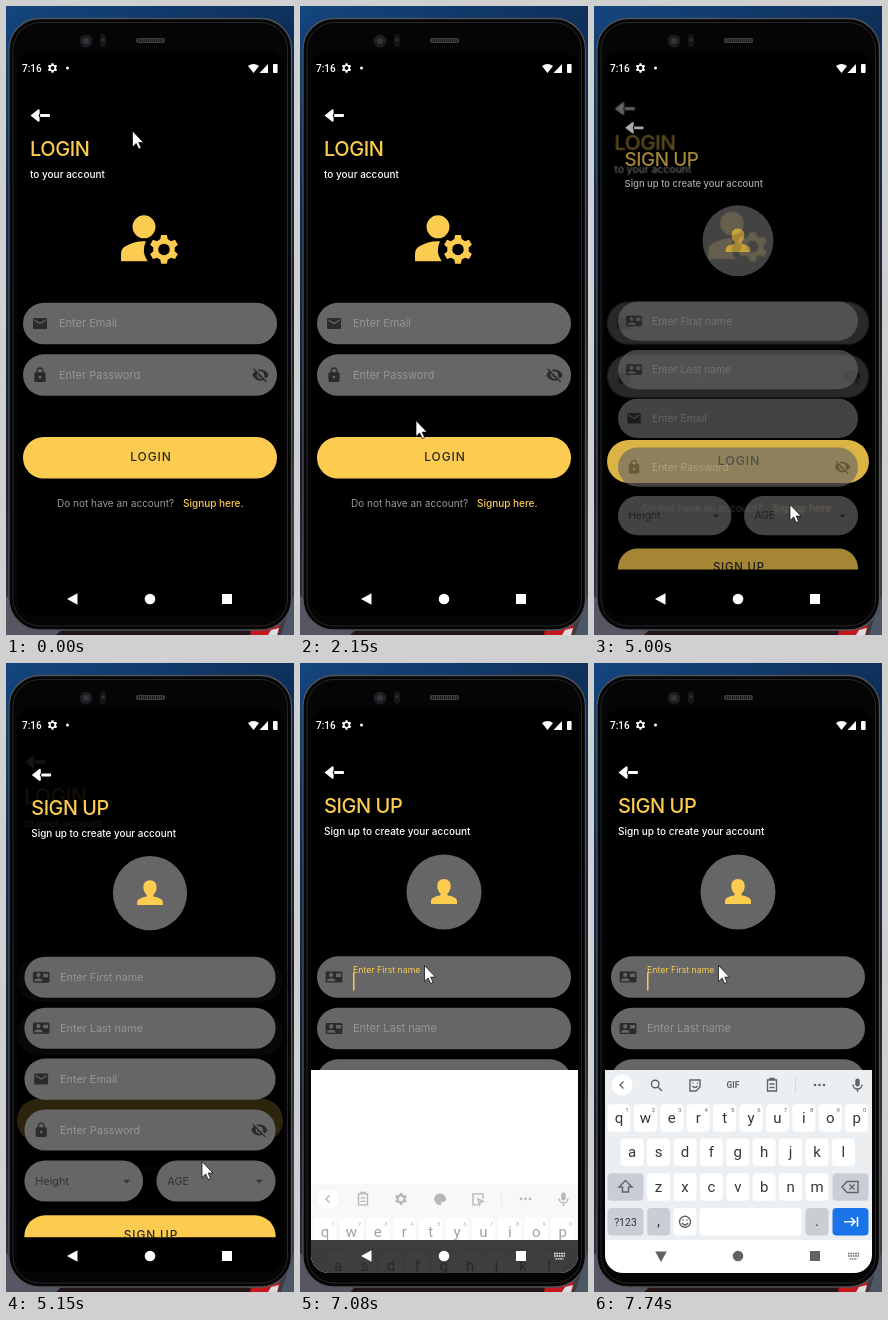
An HTML page for the animation above (8000 ms loop, 288 px wide and 629 px high).

```html
<!DOCTYPE html>
<html lang="en">
<head>
<meta charset="utf-8">
<title>Login and sign up</title>
<style>
  html, body { margin: 0; width: 100%; height: 100%; overflow: hidden; background: #000; }
  svg { display: block; width: 100vw; height: 100vh; }
  text { font-family: Inter, sans-serif; }
  .title { font-size: 20px; font-weight: 500; letter-spacing: -.45px; fill: #fbcc4f; }
  .sub { font-size: 10px; font-weight: 500; fill: #fff; }
  .hint { font-size: 11px; fill: #959595; }
  .dark { fill: #343434; }
  .button { font-size: 12px; font-weight: 500; letter-spacing: .9px; text-anchor: middle; fill: #282828; }
  .small { font-size: 10px; fill: #9a9a9a; }
  .key { font: 15px Roboto, sans-serif; text-anchor: middle; fill: #33373b; }
  .digit { font: 6px Roboto, sans-serif; text-anchor: middle; fill: #5f6368; }
  .bold { font: bold 8.5px Roboto, sans-serif; text-anchor: middle; fill: #5f6368; }
  .line { fill: none; stroke: #5f6368; stroke-width: 1.4; }
</style>
</head>
<body>
<script>
const YELLOW = '#fbcc4f', GRAY = '#666', LOOP = 8000;

const ICONS = {
  mail: 'M20 4H4c-1.1 0-2 .9-2 2v12c0 1.1.9 2 2 2h16c1.1 0 2-.9 2-2V6c0-1.1-.9-2-2-2zm0 4l-8 5-8-5V6l8 5 8-5v2z',
  lock: 'M18 8h-1V6c0-2.76-2.24-5-5-5S7 3.24 7 6v2H6c-1.1 0-2 .9-2 2v10c0 1.1.9 2 2 2h12c1.1 0 2-.9 2-2V10c0-1.1-.9-2-2-2zm-6 9c-1.1 0-2-.9-2-2s.9-2 2-2 2 .9 2 2-.9 2-2 2zm3.1-9H8.9V6c0-1.71 1.39-3.1 3.1-3.1s3.1 1.39 3.1 3.1v2z',
  card: 'M2 4h20a2 2 0 0 1 2 2v12a2 2 0 0 1-2 2H2a2 2 0 0 1-2-2V6a2 2 0 0 1 2-2zM8 6a3 3 0 1 1 0 6 3 3 0 0 1 0-6zM2 18v-1c0-2 4-3.1 6-3.1s6 1.1 6 3.1v1zM15 7h7v5h-7z',
  eye: 'M12 7c2.76 0 5 2.24 5 5 0 .65-.13 1.26-.36 1.83l2.92 2.92c1.51-1.26 2.7-2.89 3.43-4.75-1.73-4.39-6-7.5-11-7.5-1.4 0-2.74.25-3.98.7l2.16 2.16C10.74 7.13 11.35 7 12 7zM2 4.27l2.74 2.74C3.08 8.3 1.78 10.02 1 12c1.73 4.39 6 7.5 11 7.5 1.55 0 3.03-.3 4.38-.84L19.73 22 21 20.73 3.27 3zM7.53 9.8l1.55 1.55c-.05.21-.08.43-.08.65 0 1.66 1.34 3 3 3 .22 0 .44-.03.65-.08l1.55 1.55c-.67.33-1.41.53-2.2.53-2.76 0-5-2.24-5-5 0-.79.2-1.53.53-2.2z',
  gear: 'M15.75 12c0-.22-.03-.42-.06-.63l1.14-1.01-1-1.73-1.45.49c-.32-.27-.68-.48-1.08-.63L13 7h-2l-.3 1.49c-.4.15-.76.36-1.08.63l-1.45-.49-1 1.73 1.14 1.01c-.03.21-.06.41-.06.63s.03.42.06.63l-1.14 1.01 1 1.73 1.45-.49c.32.27.68.48 1.08.63L11 17h2l.3-1.49c.4-.15.76-.36 1.08-.63l1.45.49 1-1.73-1.14-1.01c.03-.21.06-.41.06-.63zM12 14a2 2 0 1 1 0-4 2 2 0 0 1 0 4z',
  person: 'M12 4a4 4 0 1 1 0 8 4 4 0 0 1 0-8zM12.67 13.02A13 13 0 0 0 5.39 14.82C4.5 15.34 4 16.3 4 17.35V20h9.26A7 7 0 0 1 12.67 13.02z'
};

// Icons use a 24 unit box centred on (x, y).
const icon = (name, x, y, scale, fill = '#2b2b2b') =>
  `<path d="${ICONS[name]}" fill="${fill}" fill-rule="evenodd" transform="translate(${x} ${y}) scale(${scale}) translate(-12 -12)"/>`;
const label = (cls, x, y, str, extra = '') => `<text class="${cls}" x="${x}" y="${y}" ${extra}>${str}</text>`;
const rect = (x, y, w, h, fill, r = 0) => `<rect x="${x}" y="${y}" width="${w}" height="${h}" rx="${r}" fill="${fill}"/>`;
const circle = (x, y, r, fill) => `<circle cx="${x}" cy="${y}" r="${r}" fill="${fill}"/>`;
const path = (d, fill) => `<path d="${d}" fill="${fill}"/>`;
const line = d => `<path class="line" d="${d}"/>`;

const pill = (y, fill = GRAY, x = 17, w = 254) => rect(x, y, w, 41.5, fill, 20.75);
const field = (y, name, hint, extra) =>
  pill(y) + icon(name, 34, y + 20.7, .7) + label('hint', 53, y + 24.6, hint, extra) +
  (name === 'lock' ? icon('eye', 254.5, y + 20.7, .74) : '');
const dropdown = (x, w, hint) =>
  pill(499.3, GRAY, x, w) + label('hint dark', x + 11, 524, hint) + path(`M${x + w - 20} 518.7h7l-3.5 3.8z`, '#343434');
const button = (y, str) => pill(y, YELLOW) + label('button', 145, y + 24, str);
const heading = (title, sub) =>
  path('M24.5 109.5L32 103.6q1.6-.8 1.6 1v2.9l-1 2 1 2v2.9q0 1.800-1.600 1z', '#fff') + rect(34, 108.1, 10, 3, '#fff', 1) +
  label('title', 24, 150, title) + label('sub', 24, 172, sub);

const loginPage = heading('LOGIN', 'to your account') +
  icon('person', 138, 232.3, 2.87, YELLOW) + icon('gear', 158, 243.4, 2.87, YELLOW) +
  field(296.800, 'mail', 'Enter Email') + field(348.3, 'lock', 'Enter Password') +
  label('small', 51, 500.5, 'Do not have an account?') +
  label('small', 177, 500.5, 'Signup here.', `style="fill:${YELLOW};font-weight:500"`);

const signupPage = heading('SIGN UP', 'Sign up to create your account') +
  circle(144, 229, 37.5, GRAY) +
  path('M144 216c4.500 0 6.700 3 6.700 7 0 3.500-1.500 6-3.200 7.500v1.800c4 1 9.500 2.200 9.500 5.700v3h-26v-3c0-3.500 5.500-4.700 9.500-5.700v-1.800c-1.700-1.500-3.200-4-3.200-7.500 0-4 2.200-7 6.700-7z', YELLOW) +
  field(293.3, 'card', 'Enter First name', 'id="firstName"') + field(344.800, 'card', 'Enter Last name') +
  field(396.3, 'mail', 'Enter Email') + field(447.800, 'lock', 'Enter Password') +
  dropdown(17, 120, 'Height') + dropdown(150.5, 120.5, 'AGE') + button(554.800, 'SIGN UP') +
  `<rect id="caret" x="53" y="309.500" width="1.500" height="18" fill="${YELLOW}"/>`;

const clipboard = x => line(`M${x - 4.5} 417h9v11h-9zM${x - 2} 417v-1.500h4v1.500M${x - 2.500} 421h5M${x - 2.500} 424.500h5`);
const earlyTools = clipboard(63) + icon('gear', 101, 422, 1.2, '#5f6368') +
  path('M140 416.500a5.800 5.800 0 1 0 0 11.600c2 0 .5-2 1.500-3h2.500c4.500-2 1-8.600-4-8.600z', '#5f6368') +
  line('M183 422v-5h-10v11h5M178 422l5 2.500-2.500 1-1 2.500z');
const finalTools = line('M65 421a3.800 3.800 0 1 1-7.600 0 3.800 3.800 0 1 1 7.600 0M64 424l4 4') +
  line('M96 417h10v7l-4 4h-6zM98.500 423q2.500 3 5 0M98.500 420h1M103 420h1') +
  label('bold', 139, 425, 'GIF') + clipboard(178);

const PITCH = 26.4, SPECIAL = '#c9ced4';
const keyCap = (x, y, w, fill = '#fff') => rect(x - w / 2, y - 13.8, w, 27.6, fill, 4);
const keyRow = (letters, x0, y) => [...letters].map((c, i) =>
  keyCap(x0 + i * PITCH, y, 23) + label('key', x0 + i * PITCH, y + 5, c)).join('');
const digits = [...'1234567890'].map((d, i) => label('digit', 33 + i * PITCH, 449, d)).join('');

const keyboard = rect(11, 407, 267, 170, '#eceff2') +
  circle(28, 422, 10.5, '#fff') + line('M29.500 418.500l-3.500 3.500 3.500 3.500') +
  `<g id="earlyTools">${earlyTools}</g><g id="finalTools">${finalTools}</g>` +
  rect(201, 415, 1, 15, '#d5d9dd') + [221, 225.5, 230].map(x => circle(x, 422, 1.3, '#5f6368')).join('') +
  rect(261.3, 415.5, 4.4, 8, '#5f6368', 2.2) + line('M259 421.500a4.500 4.500 0 0 0 9 0M263.500 426v3') +
  keyRow('qwertyuiop', 25, 455) + digits + keyRow('asdfghjkl', 38.200, 489.3) + keyRow('zxcvbnm', 64.600, 524) +
  keyCap(31.5, 524, 36, SPECIAL) + line('M31.500 517.500l-6.500 6.500h3.500v5h6v-5h3.500z') +
  keyCap(256.5, 524, 36, SPECIAL) + line('M253 518.500h11v11h-11l-5-5.500zM255.500 521.500l5 5M260.500 521.500l-5 5') +
  keyCap(31.5, 558.800, 36, SPECIAL) + label('key', 31.5, 562.5, '?123', 'style="font-size:10.500px"') +
  keyCap(64.6, 558.800, 23, SPECIAL) + label('key', 64.6, 563, ',') +
  keyCap(91, 558.800, 23) + line('M96.500 558.800a5.500 5.500 0 1 1-11 0 5.500 5.500 0 1 1 11 0M88 560q3 4 6 0M88.500 557h1.200M92.300 557h1.200') +
  keyCap(156.5, 558.800, 102) + keyCap(223, 558.800, 23, SPECIAL) + label('key', 223, 563, '.') +
  keyCap(256.5, 558.800, 36, '#1a73e8') +
  '<path d="M250 558.800h11M257 554.800l4 4-4 4M263.500 554v9.600" fill="none" stroke="#fff" stroke-width="1.600"/>';

const navBar = '<path id="navBack" d="M61 593l10.500-5.800v11.600z"/><circle cx="144" cy="593" r="5.300"/><path d="M216 588h10v10h-10z"/>';
const smallKeyboard = '<path id="imeSwitch" fill="none" stroke-width="1.300" stroke-dasharray="1.600 .8" d="M254 590.500h11M254 593h11M255.500 595.800h8"/>';

const backdrop = rect(0, 0, 288, 629, 'url(#sky)') +
  path('M0 590L30 612 60 629H0z', '#565763') + path('M60 620h190v9H50z', '#231418') +
  path('M244 629l4-20 28-2-4 22z', '#c4161d') + path('M262 629l3-5 8-2-2 7z', '#ddd') + path('M275 629l13-40v40z', '#4d5664');
const phone = '<rect x="3" y="12.500" width="282.500" height="611.500" rx="31" fill="#050505" stroke="#50545a" stroke-width="1.300"/>' +
  '<rect x="7" y="16.500" width="274.500" height="603.500" rx="27" fill="none" stroke="#252628"/>' +
  circle(80, 35, 6.5, '#1c1d20') + circle(80, 35, 3, '#33363b') + rect(94, 28, 6, 13, '#151618', 3) + circle(97, 34, 1.8, '#2e3034') +
  rect(130, 32, 29, 5, '#3a3b3d', 2) + line('M132 34.500h25').replace('class="line"', 'fill="none" stroke="#1b1b1b" stroke-width="3" stroke-dasharray="1 1"');
const statusBar = label('', 16, 66, '7:16', 'fill="#fff" style="font:500 10px Roboto,sans-serif"') +
  icon('gear', 46.5, 62, .95, '#fff') + circle(61.5, 62, 1.5, '#fff') +
  path('M242 60q5.500-4 11 0l-5.500 7z', '#fff') + path('M253.500 67h8.500v-9z', '#fff') + rect(267, 58, 4.6, 9, '#fff', 1);

document.body.innerHTML = `
<svg viewBox="0 0 288 629" preserveAspectRatio="none">
  <defs>
    <linearGradient id="sky" x2=".25" y2="1">
      <stop offset="0" stop-color="#14467f"/><stop offset=".3" stop-color="#0d2c54"/>
      <stop offset=".7" stop-color="#191e2b"/><stop offset="1" stop-color="#3b3b45"/>
    </linearGradient>
    <clipPath id="screen"><rect x="11" y="45" width="267" height="565" rx="18"/></clipPath>
    <clipPath id="viewport"><rect x="11" y="70" width="267" height="507"/></clipPath>
  </defs>
  ${backdrop}${phone}
  <g clip-path="url(#screen)">
    ${rect(11, 45, 267, 565, '#000')}${statusBar}
    <g id="login">${loginPage}</g>
    <g id="loginButton">${button(431, 'LOGIN')}</g>
    <g id="signup" clip-path="url(#viewport)">${signupPage}</g>
    <g id="panel">
      ${rect(11, 407, 267, 203, '#fff')}
      <g id="keyboard">${keyboard}</g>
      <rect id="shade" x="11" y="577" width="267" height="33"/>
    </g>
    <g id="nav">${navBar}${smallKeyboard}</g>
  </g>
  <path id="pointer" d="M0 0V16L3.700 12.500 6.200 18 8.600 17 6.200 11.600H11z" fill="#fff" stroke="#000" stroke-width=".7"/>
</svg>`;

// Tracks hold each value until the next time, like a screen recording.
const pointerTrack = [
  [0, 126.5, 125], [500, 123, 136], [650, 88, 280], [770, 111, 429], [920, 170, 592], [1040, 246, 460],
  [1190, 262, 385], [1310, 170, 311], [1430, 78, 460], [1580, 138, 549], [1730, 227, 484], [1880, 172, 401],
  [2000, 117, 415], [2150, 116, 414.5], [2890, 136, 440], [3010, 158, 462.5], [3160, 178, 481], [3280, 196, 498.5],
  [5660, 172, 428], [5780, 150.5, 361], [5920, 131, 288], [6290, 128.5, 294.5], [6440, 124.5, 302.5]
];
const pageTrack = [[0, 0], [5000, .6], [5150, .92], [5270, 1]];
const labelTrack = [[0, 0], [6720, .5], [6840, 1]];
const keyboardTrack = [[0, 0], [7080, .33], [7200, .79], [7320, 1]];

const at = (track, t) => track.findLast(entry => entry[0] <= t);
const mix = (a, b, p) => a + (b - a) * p;
const el = id => document.getElementById(id);
const set = (id, attrs) => { for (const k in attrs) el(id).setAttribute(k, attrs[k]); };
const show = (id, visible) => set(id, { visibility: visible ? 'visible' : 'hidden' });
const zoom = s => `translate(144 332) scale(${s}) translate(-144 -332)`;

function drawPages(t) {
  const p = at(pageTrack, t)[1], leaving = zoom(1 + .052 * p);
  set('login', { transform: leaving, opacity: 1 - p });
  set('loginButton', { transform: leaving, opacity: Math.min(1, 2.2 * (1 - p)) });
  set('signup', { transform: zoom(mix(.8625, 1, p)), opacity: Math.min(1, p * 1.1) });
}

function drawInput(t) {
  const p = at(labelTrack, t)[1];
  set('firstName', { y: mix(317.9, 309.5, p), style: `font-size:${mix(11, 8.75, p)}px;fill:${p ? YELLOW : '#959595'}` });
  show('caret', t >= 6720 && (t - 6720) % 1020 < 480);
}

function drawKeyboard(t) {
  const p = at(keyboardTrack, t)[1], color = p > .9 ? '#5f6368' : '#fff';
  set('panel', { display: t >= 6960 ? 'inline' : 'none' });
  set('keyboard', { transform: `translate(0 ${170 * (1 - p)})`, opacity: Math.min(1, p * 1.4) });
  set('shade', { opacity: (1 - p) ** .7 });
  set('earlyTools', { display: p < .5 ? 'inline' : 'none' });
  set('finalTools', { display: p < .5 ? 'none' : 'inline' });
  set('nav', { fill: color });
  set('imeSwitch', { stroke: color });
  show('imeSwitch', t >= 6960);
  set('navBack', { transform: `rotate(${t >= 7460 ? -90 : 0} 67 593)` });
}

function tick() {
  const t = performance.now() % LOOP, [, x, y] = at(pointerTrack, t);
  drawPages(t);
  drawInput(t);
  drawKeyboard(t);
  set('pointer', { transform: `translate(${x} ${y})` });
  requestAnimationFrame(tick);
}
tick();
</script>
</body>
</html>
```
